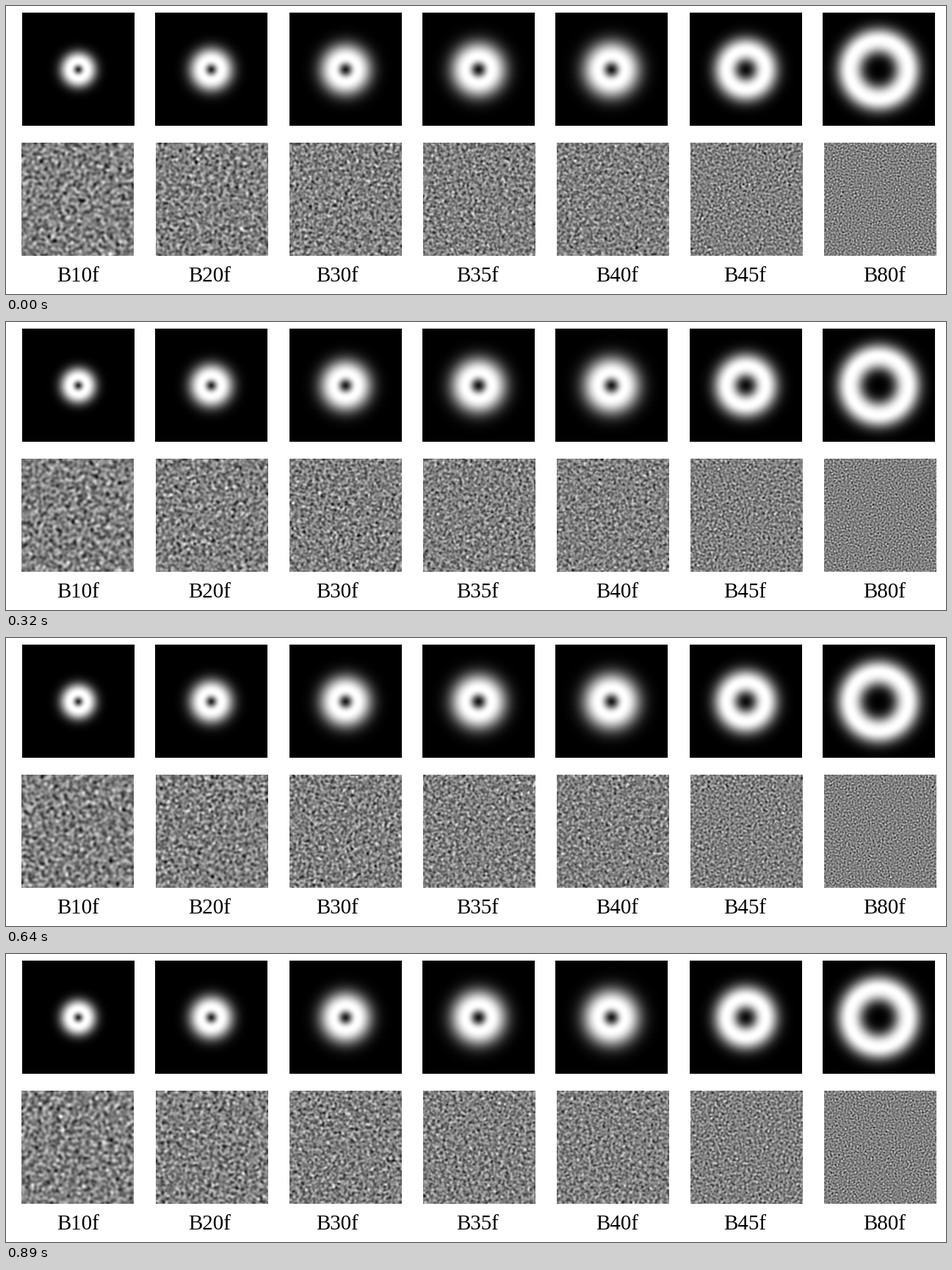
Recreate the animation shown at these times as a matplotlib script. Size 1280 by 392 pixels, loop 1020 ms.

```python
import numpy as np
import matplotlib.pyplot as plt
from matplotlib.animation import FuncAnimation

W, H, DPI = 1280, 392, 100
ROWS, COLS = 154, 153
STEP_MS, LOOP_MS = 10, 1020
HOLDS = [130, 130, 60, 130, 60, 130, 60, 130, 60, 130]
ENDS = np.cumsum(HOLDS)
TEXTURES = 5

# label, label x, ring panel x, ring radius, inner and outer half widths, contrast
BANDS = [
    ("B10f", 69.0, 22, 12.0, 8.0, 11.0, 30),
    ("B20f", 248.5, 203, 14.5, 9.5, 13.5, 30),
    ("B30f", 422.5, 386, 17.0, 10.5, 16.0, 30),
    ("B35f", 613.0, 567, 18.5, 11.0, 17.0, 29),
    ("B40f", 803.0, 748, 19.0, 11.5, 17.5, 28),
    ("B45f", 977.0, 931, 27.5, 15.0, 14.0, 27),
    ("B80f", 1167.0, 1112, 41.0, 17.5, 13.5, 25),
]

RADIUS = np.hypot(*np.ogrid[:ROWS, :COLS] - np.array([77, 76], dtype=object)
                  ) if False else np.hypot(np.arange(ROWS)[:, None] - 77,
                                           np.arange(COLS)[None, :] - 76)
SOFTEN = np.exp(-(RADIUS / 45) ** 2)
rng = np.random.default_rng(7)


def ring(peak, inner, outer):
    """Soft band-pass mask: a steep hole and a wider outer skirt."""
    d = RADIUS - peak
    falloff = np.where(d < 0, np.abs(d / inner) ** 2.6, (d / outer) ** 2)
    return np.exp(-np.log(2) * falloff)


def band_noise(mask, contrast):
    """White noise limited to the frequencies that the mask lets through."""
    spectrum = np.fft.fft2(rng.standard_normal(mask.shape))
    noise = np.fft.ifft2(spectrum * np.fft.ifftshift(mask * SOFTEN)).real
    noise -= noise.mean()
    return np.clip(128 + contrast * noise / noise.std(), 0, 255)


def place(stage, panel, x, y):
    stage[y:y + ROWS, x:x + COLS] = panel


def build_stages():
    stages = np.full((TEXTURES, H, W), 255.0)
    for i, (_, _, left, peak, inner, outer, contrast) in enumerate(BANDS):
        mask = ring(peak, inner, outer)
        for stage in stages:
            place(stage, 255 * mask, left, 9)
            place(stage, band_noise(mask, contrast), round(21.4 + 182.1 * i), 186)
    return stages.astype(np.uint8)


stages = build_stages()

fig = plt.figure(figsize=(W / DPI, H / DPI), dpi=DPI, facecolor="white")
ax = fig.add_axes([0, 0, 1, 1])
picture = ax.imshow(stages[0], cmap="gray", vmin=0, vmax=255,
                    extent=(0, W, H, 0), interpolation="nearest", aspect="auto")
ax.axis("off")

for label, x, *_ in BANDS:
    ax.text(x, 375, label, family="Liberation Serif", fontsize=29 * 72 / DPI,
            color="black", ha="left", va="baseline")


def update(frame):
    hold = np.searchsorted(ENDS, frame * STEP_MS, side="right")
    picture.set_data(stages[hold % TEXTURES])
    return [picture]


anim = FuncAnimation(fig, update, frames=LOOP_MS // STEP_MS,
                     interval=STEP_MS, repeat=True, repeat_delay=0)
plt.show()
```
